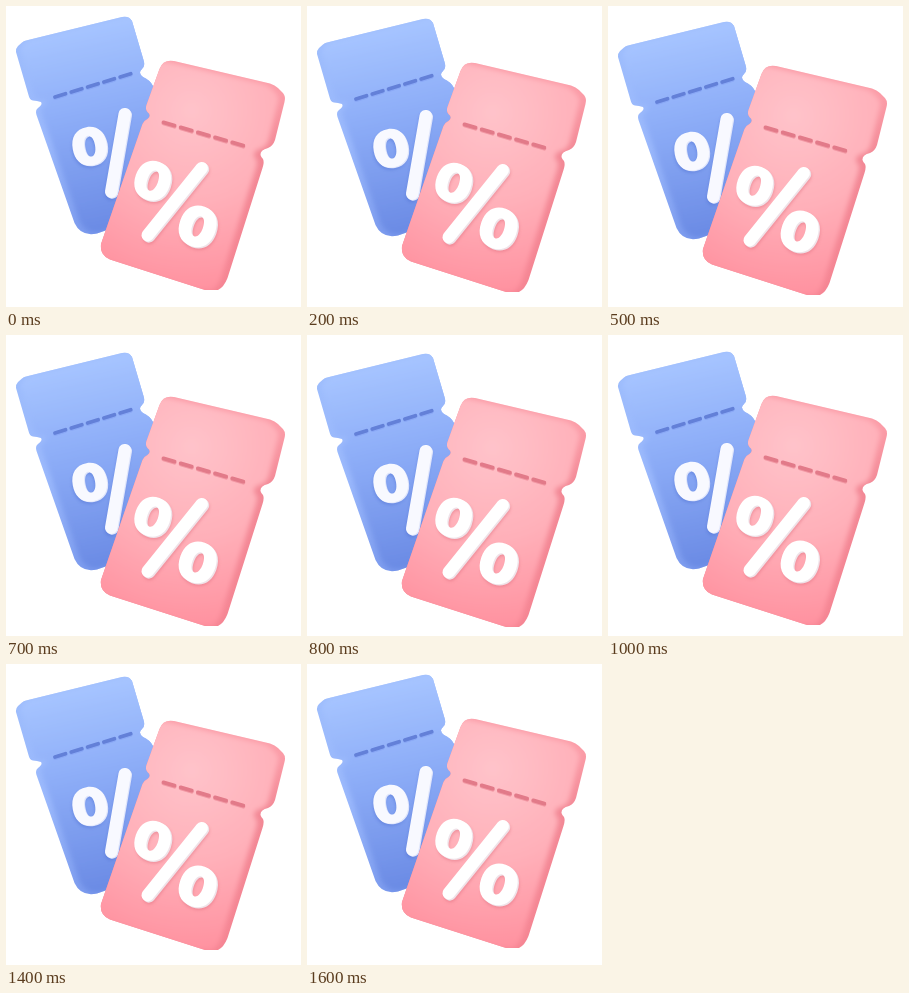
Recreate the animation shown at these times as an HTML page. Size 295 px wide and 301 px high, loop 1700 ms.

```html
<!DOCTYPE html>
<html lang="en">
<head>
<meta charset="utf-8">
<title>Discount tickets</title>
<style>
  html, body { margin: 0; width: 100%; height: 100%; overflow: hidden; background: #fff; }
  svg { display: block; width: 100vw; height: 100vh; }
  .line { fill: none; stroke-linecap: round; }
</style>
</head>
<body>
<svg viewBox="0 0 295 301">
  <defs>
    <linearGradient id="blueFace" gradientUnits="userSpaceOnUse" x1="62" y1="26" x2="106" y2="224">
      <stop offset="0" stop-color="#a6c4ff"/>
      <stop offset=".4" stop-color="#8eaef8"/>
      <stop offset="1" stop-color="#6a8ae4"/>
    </linearGradient>
    <linearGradient id="blueSide" gradientUnits="userSpaceOnUse" x1="20" y1="40" x2="80" y2="228">
      <stop offset="0" stop-color="#9dbcfc"/>
      <stop offset=".5" stop-color="#9ab8fc"/>
      <stop offset="1" stop-color="#7c9bee"/>
    </linearGradient>
    <radialGradient id="pinkFace" gradientUnits="userSpaceOnUse" cx="192" cy="104" r="182">
      <stop offset="0" stop-color="#ffc3ca"/>
      <stop offset=".5" stop-color="#ffb0b9"/>
      <stop offset="1" stop-color="#ff919f"/>
    </radialGradient>
    <linearGradient id="pinkSide" gradientUnits="userSpaceOnUse" x1="276" y1="85" x2="218" y2="284">
      <stop offset="0" stop-color="#fb9ca7"/>
      <stop offset=".3" stop-color="#f28895"/>
      <stop offset="1" stop-color="#f58593"/>
    </linearGradient>
    <filter id="soft" x="-30%" y="-30%" width="160%" height="160%">
      <feGaussianBlur stdDeviation="1.6"/>
    </filter>
    <filter id="softer" x="-10%" y="-10%" width="120%" height="120%">
      <feGaussianBlur stdDeviation="2.4"/>
    </filter>
    <clipPath id="blueClip"><use href="#blueShape"/></clipPath>
    <clipPath id="pinkClip"><use href="#pinkShape"/></clipPath>
    <path id="blueShape" d="M20 34.500 L116 11 Q123 9.500 126 15 L137.500 54 Q139.500 60 136 63
      Q131.500 67 137 71 Q144 74 147 80 L160 130 L118 218 L91 227.500 Q75 231 68.500 217
      L30.500 109 Q29 104 32 102 Q37 98.500 35 96 Q31 94.500 27 94.500 Q23.500 94 22.500 89
      L10 46 Q9.500 42.500 12 40 L16 36.500 Q17.500 35 20 34.500 Z"/>
    <path id="pinkShape" d="M168 55 L264 77.500 Q269 79 272 82 L277 87 Q280 90.500 278.500 96
      L269 134 Q267 140 262 142 Q254 144 254.500 149 Q255 151 257 153 Q258.500 156 256.500 162
      L221.500 272 Q218 281 212 284 L199 284 L104 253.500 Q93.500 249 95 238 L136.500 118
      Q138 114.500 141.500 113 Q146 109.500 141.500 106 Q139 103.500 140.500 99 L153.500 63
      Q157 53 168 55 Z"/>
    <g id="blueMark">
      <path id="blueRing"/>
      <path class="line" d="M119 108.500 L105.500 186" stroke-width="12.500"/>
    </g>
    <g id="pinkMark">
      <path id="pinkRingA"/>
      <path id="pinkRingB"/>
      <path class="line" d="M196 162.500 L142 229.500" stroke-width="12.500"/>
    </g>
  </defs>
  <rect width="295" height="301" fill="#fff"/>
  <g id="tickets">
    <use href="#blueShape" fill="url(#blueSide)"/>
    <g clip-path="url(#blueClip)">
      <use href="#blueShape" fill="url(#blueFace)" filter="url(#softer)" transform="translate(5 -1.500)"/>
      <g id="blueDashes"></g>
      <use href="#blueMark" fill="#4f6fd0" stroke="#4f6fd0" stroke-width="0" opacity=".45" filter="url(#soft)" transform="translate(-.5 2)"/>
      <use href="#blueMark" fill="#dfe5fb" stroke="#dfe5fb" stroke-width="0" transform="translate(.8 .5)"/>
      <use href="#blueMark" fill="#f8f9ff" stroke="#f8f9ff" stroke-width="0" transform="translate(-.3 -.3)"/>
    </g>
    <use href="#pinkShape" fill="url(#pinkSide)"/>
    <g clip-path="url(#pinkClip)">
      <use href="#pinkShape" fill="url(#pinkFace)" filter="url(#softer)" transform="translate(-6.500 .5)"/>
      <g id="pinkDashes"></g>
      <use href="#pinkMark" fill="#e0707f" stroke="#e0707f" stroke-width="0" opacity=".5" filter="url(#soft)" transform="translate(1.300 2.500)"/>
      <use href="#pinkMark" fill="#efe3e9" stroke="#efe3e9" stroke-width="0" transform="translate(1 .9)"/>
      <use href="#pinkMark" fill="#fff" stroke="#fff" stroke-width="0" transform="translate(-.3 -.3)"/>
    </g>
  </g>
</svg>
<script>
  const STEP = 100, LOOP = 1700, PEAK = 8;
  const byId = id => document.getElementById(id);

  // Closed oval; k = .55 is an ellipse, larger is squarer
  function oval(cx, cy, rx, ry, k) {
    const a = rx * k, b = ry * k;
    return `M${cx - rx} ${cy}c0 ${-b} ${rx - a} ${-ry} ${rx} ${-ry}s${rx} ${ry - b} ${rx} ${ry}` +
      `s${a - rx} ${ry} ${-rx} ${ry}s${-rx} ${b - ry} ${-rx} ${-ry}z`;
  }

  function addRing(id, cx, cy, rx, ry, tilt) {
    const ring = byId(id);
    ring.setAttribute("d", oval(cx, cy, rx, ry, .62) + oval(cx, cy, 5.4, 10.5, .6));
    ring.setAttribute("fill-rule", "evenodd");
    ring.setAttribute("transform", `rotate(${tilt} ${cx} ${cy})`);
  }

  // Five perforation slots, each with a light lower lip
  function addDashes(id, x, y, dx, dy, len, dark, light) {
    const k = len / Math.hypot(dx, dy);
    let d = "";
    for (let i = 0; i < 5; i++) {
      d += `M${x + i * dx} ${y + i * dy}l${dx * k} ${dy * k}`;
    }
    byId(id).innerHTML =
      `<path class="line" d="${d}" stroke="${light}" stroke-width="4" transform="translate(0 1)"/>` +
      `<path class="line" d="${d}" stroke="${dark}" stroke-width="3.8"/>`;
  }

  addRing("blueRing", 84, 140.5, 17.2, 19.3, -10);
  addRing("pinkRingA", 147, 175, 17.8, 20, 20);
  addRing("pinkRingB", 192, 220.7, 18.4, 20.8, 20);
  addDashes("blueDashes", 49, 91, 16.3, -5, 11, "#6380d8", "#8aa8f6");
  addDashes("pinkDashes", 157.5, 116.4, 17.2, 5, 11.5, "#e27a89", "#f299a5");

  // Bobs down and back in whole-pixel steps
  function draw(ms) {
    const step = Math.floor((ms % LOOP) / STEP);
    const y = PEAK - Math.abs(PEAK - step);
    byId("tickets").setAttribute("transform", `translate(0 ${y})`);
  }

  const start = performance.now();
  function tick() {
    draw(performance.now() - start);
    requestAnimationFrame(tick);
  }
  tick();
</script>
</body>
</html>
```
